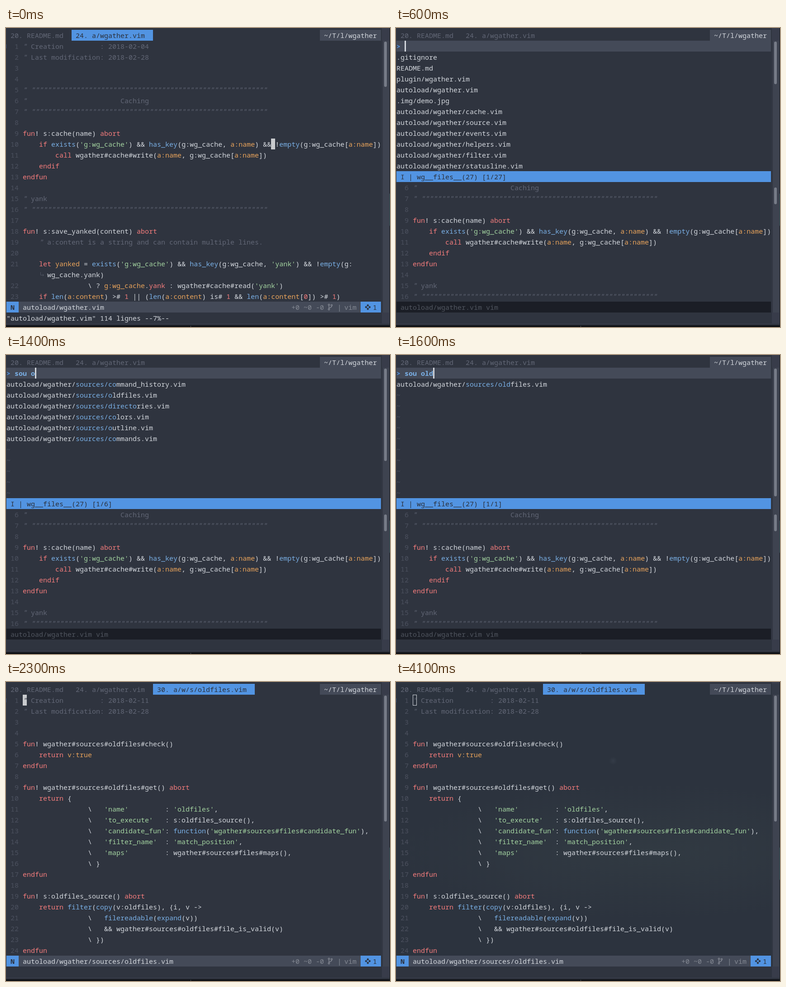
Recreate the animation shown at these times as an HTML page. Size 849 px wide and 660 px high, loop 6400 ms.

```html
<!DOCTYPE html>
<html lang="en">
<head>
<meta charset="utf-8">
<title>Editor file finder</title>
<style>
  html, body { margin: 0; width: 100%; height: 100%; overflow: hidden; background: #2f343f; }
  #stage { position: relative; width: 849px; height: 660px; overflow: hidden; }
  #stage div, #stage svg { position: absolute; }
  .cell {
    height: 24px; white-space: pre; color: #d3d7dd;
    font: 15px/24px "Noto Sans Mono", "DejaVu Sans Mono", monospace;
    font-variant-ligatures: none;
  }
  .dim { color: #626776; }
  .num { color: #4c515f; }
  .grey { color: #848993; }
  .panel { background: #444a58; }
  .accent { background: #5294e2; color: #2b303b; }
  .idle { background: #1b1e26; color: #50555f; }
  .prompt { color: #5294e2; font-weight: bold; }
  .query { font-weight: bold; }
  .bold { font-weight: bold; }
  .kw { color: #f47c7c; }
  .fn, .query { color: #7ab0e6; }
  .str { color: #a3d3a0; }
  .var { color: #e8a35b; }
  .quote { font-style: italic; }
  .block { background: #c9cbce; color: #2f343f; }
  .beam { background: #d3d7dd; }
  .hollow { box-sizing: border-box; border: 1px solid #d3d7dd; }
  .gutter { left: 831px; top: 0; width: 17px; height: 655px; background: #383c4a; }
  .edge { left: 848px; top: 0; width: 1px; height: 660px; background: linear-gradient(#12151b 365px, #2e4f50 366px 436px, #12151b 437px); }
  .margin { left: 0; top: 652px; width: 848px; height: 3px; background: #343945; }
  .shadow { left: 0; top: 655px; width: 849px; height: 5px; background: linear-gradient(#20242c 2px, #0d0f13 2px); }
  .speck { left: 408px; top: 658px; width: 1px; height: 1px; background: #aab; }
  .track { left: 832px; width: 15px; box-sizing: border-box; background: #3e4350; border-left: 1px solid #2d313b; }
  .thumb { left: 836px; width: 6px; border-radius: 3px; background: #767b87; }
  .sign { left: 0; top: 36px; width: 1px; height: 9px; background: #3a4f78; }
  #stage #glow {
    left: 0; top: 4px; width: 849px; height: 624px;
    background:
      radial-gradient(circle 9px at 480px 170px, rgba(110,125,140,.12), transparent),
      radial-gradient(ellipse 560px 150px at 560px 370px, rgba(85,105,95,.13), transparent),
      rgba(28,42,54,.1);
  }
</style>
</head>
<body>
<div id="stage">
  <div class="gutter"></div><div class="margin"></div>
  <div class="shadow"></div><div class="speck"></div><div class="edge"></div>
  <div id="glow"></div>
  <div id="screen"></div>
</div>
<script>
const LOOP = 6400, COL = 9, ROW = 24, COLS = 92;
const RULE = '" ' + '"'.repeat(58);
const CONT = ' '.repeat(16) + '\\';

const cacheFile = [
  '" Creation         : 2018-02-04',
  '" Last modification: 2018-02-28',
  '', '',
  RULE,
  '"' + ' '.repeat(23) + 'Caching',
  RULE,
  '',
  'fun! s:cache(name) abort',
  "    if exists('g:wg_cache') && has_key(g:wg_cache, a:name) && !empty(g:wg_cache[a:name])",
  '        call wgather#cache#write(a:name, g:wg_cache[a:name])',
  '    endif',
  'endfun',
  '',
  '" yank',
  RULE,
  '',
  'fun! s:save_yanked(content) abort',
  '    " a:content is a string and can contain multiple lines.',
  '',
  "    let yanked = exists('g:wg_cache') && has_key(g:wg_cache, 'yank') && !empty(g:\n      wg_cache.yank)",
  CONT + " ? g:wg_cache.yank : wgather#cache#read('yank')",
  '    if len(a:content) ># 1 || (len(a:content) is# 1 && len(a:content[0]) ># 1)'
];

const oldFile = [
  '" Creation         : 2018-02-11',
  '" Last modification: 2018-02-28',
  '', '',
  'fun! wgather#sources#oldfiles#check()',
  '    return v:true',
  'endfun',
  '',
  'fun! wgather#sources#oldfiles#get() abort',
  '    return {',
  CONT + "   'name'         : 'oldfiles',",
  CONT + "   'to_execute'   : s:oldfiles_source(),",
  CONT + "   'candidate_fun': function('wgather#sources#files#candidate_fun'),",
  CONT + "   'filter_name'  : 'match_position',",
  CONT + "   'maps'         : wgather#sources#files#maps(),",
  CONT + ' }',
  'endfun',
  '',
  'fun! s:oldfiles_source() abort',
  '    return filter(copy(v:oldfiles), {i, v ->',
  CONT + '   filereadable(expand(v))',
  CONT + '   && wgather#sources#oldfiles#file_is_valid(v)',
  CONT + ' })',
  'endfun'
];

const inDir = (dir, names) => names.split(' ').map(name => `${dir}/${name}.vim`);
const files = [
  '.gitignore', 'README.md', 'plugin/wgather.vim', 'autoload/wgather.vim', '.img/demo.jpg',
  ...inDir('autoload/wgather', 'cache source events helpers filter statusline prompt keys'),
  ...inDir('autoload/wgather/sources',
    'command_history oldfiles buffers directories files colors tags outline marks commands mru yank lines helptags')
];

const escapeHtml = s => s.replace(/&/g, '&amp;').replace(/</g, '&lt;').replace(/>/g, '&gt;');
const span = (cls, s) => `<span class="${cls}">${s}</span>`;

const syntax = new RegExp([
  "(?<str>'[^']*')",
  '(?<var>\\ba:\\w+|v:true|\\byanked\\b|g:\\w+(?=\\.yank :))',
  '(?<kw>\\b(?:fun|endfun|abort|if|endif|call|let|return|\\d)\\b|\\byank(?= :))',
  '(?<fn>\\b(?:exists|has_key|empty|len|filter|copy|expand|filereadable|function)(?=\\())'
].join('|'), 'g');

function highlight(line) {
  if (/^\s*"/.test(line)) return span('dim', line.replace(/"+/g, q => span('quote', q)));
  return escapeHtml(line).replace(syntax, (token, ...rest) => {
    const groups = rest[rest.length - 1];
    return span(Object.keys(groups).find(key => groups[key]), token);
  });
}

const box = (cls, x, y, w, h, html = '') =>
  `<div class="${cls}" style="left:${x}px;top:${y}px;width:${w}px;height:${h}px">${html}</div>`;
const put = (col, row, html, cls = '', cols = COLS - col) =>
  box('cell ' + cls, 1 + col * COL, 4 + row * ROW, cols * COL, ROW, html);

const scrollbar = (top, bottom, from, to) =>
  `<div class="track" style="top:${top}px;height:${bottom - top}px"></div>` +
  `<div class="thumb" style="top:${from}px;height:${to - from}px"></div>`;

function tabs(active) {
  const labels = [[0, '20. README.md'], [16, '24. a/wgather.vim'], [36, '30. a/w/s/oldfiles.vim']];
  return labels.slice(0, Math.max(2, active + 1)).map(([col, label], i) =>
    put(col, 0, ` ${label}  `, i === active ? 'accent' : 'dim', label.length + 3)
  ).join('') + put(77, 0, ' ~/T/l/wgather ', 'panel');
}

function code(lines, first, row) {
  let html = '';
  for (let i = first; i < lines.length && row < 25; i++) {
    html += put(0, row, String(i + 1).padStart(3), 'num', 4);
    for (const part of lines[i].split('\n')) html += put(4, row++, highlight(part));
  }
  return html;
}

const icons = `<svg width="849" height="660" style="left:0;top:0" fill="none">
  <g stroke="#848993" stroke-width="1.4">
    <circle cx="714" cy="611" r="1.6"/><circle cx="714" cy="621" r="1.6"/><circle cx="720" cy="612" r="1.6"/>
    <path d="M714 613v6M720 614q0 3-6 4"/>
  </g>
  <path fill="#2b303b" d="M800 609.5l2.7 2.7-2.7 2.7-2.7-2.7zM800 617.3l2.7 2.7-2.7 2.7-2.7-2.7zM796.1 613.4l2.7 2.7-2.7 2.7-2.7-2.7zM803.9 613.4l2.7 2.7-2.7 2.7-2.7-2.7z"/>
</svg>`;

const wrapMark = `<svg width="12" height="12" style="left:74px;top:538px" fill="none" stroke="#505562">
  <path d="M2.5 1v6.5H9M7 5l2.5 2.5L7 10"/></svg>`;

const statusLine = path =>
  put(0, 25, '', 'panel') + put(0, 25, ' N ', 'accent bold', 3) + put(4, 25, path) +
  put(70, 25, '+0 ~0 -0', 'grey') + put(81.3, 25, '|', 'grey') + put(83, 25, 'vim', 'grey') +
  put(87, 25, '   1 ', 'accent') + icons;

const sign = '<div class="sign"></div>';

const cacheScreen = () =>
  tabs(1) + code(cacheFile, 0, 1) + wrapMark + sign +
  put(65, 10, ' ', 'block', 1) + statusLine('autoload/wgather.vim') +
  put(0, 26, '"autoload/wgather.vim" 114 lignes --7%--') + scrollbar(28, 628, 30, 130);

const cursors = {
  on: put(4, 1, span('quote', '"'), 'block', 1),
  off: '',
  hollow: put(4, 1, '', 'hollow', 1)
};

const oldScreen = cursor =>
  tabs(2) + code(oldFile, 0, 1) + sign + cursors[cursor] +
  statusLine('autoload/wgather/sources/oldfiles.vim') + scrollbar(28, 628, 30, 308);

// A space in the query matches any text in between.
function search(query) {
  const pattern = new RegExp(query.replace(/ /g, '.*?'));
  return files.filter(path => pattern.test(path))
    .map(path => query ? path.replace(pattern, hit => span('fn', hit)) : path);
}

function finderScreen(query, { listed = query, block = false, empty = false, bar = true } = {}) {
  const hits = empty ? [] : search(listed);
  let html = tabs(-1) + put(0, 1, '', 'panel') + put(0, 1, '&gt;', 'prompt', 1) + put(2, 1, query, 'query');
  for (let i = 0; i < 11; i++) html += put(0, i + 2, hits[i] || '~', hits[i] ? '' : 'num');
  const col = 2 + query.length;
  html += block ? put(col, 1, '', 'block', 1) : box('beam', 1 + col * COL, 28, 3, ROW);
  html += put(0, 13, empty ? '' : ` I | wg__files__(27) [1/${hits.length}]`, 'accent');
  html += code(cacheFile, 5, 14) + put(0, 25, ' autoload/wgather.vim vim', 'idle');
  if (bar) html += scrollbar(28, 340, 30, 30 + 306 * 12 / (hits.length + 12));
  return html + scrollbar(340, 628, 352, 389);
}

const steps = [
  [0, cacheScreen()],
  [300, finderScreen('', { empty: true, block: true, bar: false })],
  [400, finderScreen('', { block: true, bar: false })],
  [500, finderScreen('', { block: true })],
  [600, finderScreen('')],
  [800, finderScreen('s')],
  [900, finderScreen('so')],
  [1000, finderScreen('sou')],
  [1200, finderScreen('sou ')],
  [1300, finderScreen('sou o', { listed: 'sou ' })],
  [1400, finderScreen('sou o')],
  [1500, finderScreen('sou ol')],
  [1600, finderScreen('sou old')],
  [2100, finderScreen('sou old', { block: true, bar: false })],
  [2300, oldScreen('on')],
  [3000, oldScreen('off')],
  [3300, oldScreen('on')],
  [4000, oldScreen('hollow')]
];

const screen = document.getElementById('screen');
const glow = document.getElementById('glow');
const start = performance.now();
let shown = null;

function draw() {
  const time = (performance.now() - start) % LOOP;
  const current = steps.filter(([at]) => at <= time).pop();
  if (current !== shown) {
    shown = current;
    screen.innerHTML = current[1];
  }
  glow.style.opacity = time < 4000 ? 0 : time < 4100 ? 0.5 : 1;
  requestAnimationFrame(draw);
}
draw();
</script>
</body>
</html>
```
